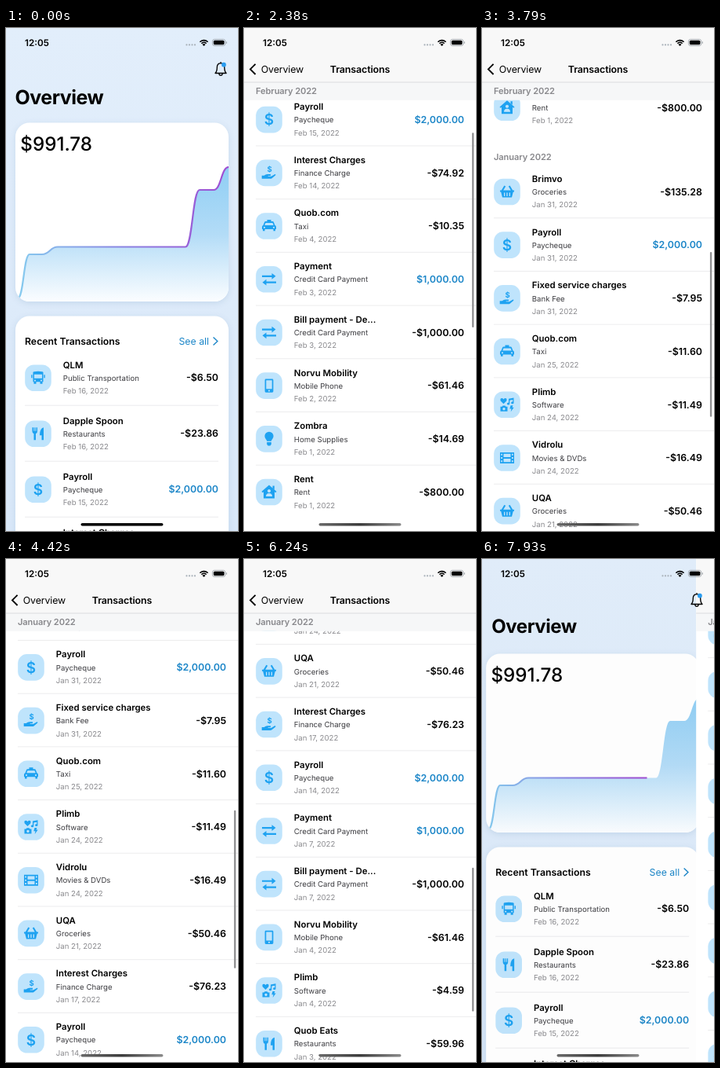
These frames come from a looping animation (296x640 px, 8 s). An HTML page with a canvas:

```html
<!DOCTYPE html>
<html lang="en">
<head>
<meta charset="utf-8">
<title>Overview</title>
<style>
html, body { margin: 0; width: 100%; height: 100%; overflow: hidden; background: #fff; }
canvas { display: block; width: 296px; height: 640px; }
</style>
</head>
<body>
<canvas id="stage"></canvas>
<script>
const W = 296, H = 640, LOOP = 8000;
const canvas = document.getElementById('stage');
const ctx = canvas.getContext('2d');
const dpr = window.devicePixelRatio || 1;
canvas.width = W * dpr;
canvas.height = H * dpr;

const BLUE = '#1c86c8', GLYPH = '#1ea2f1', TILE = '#bfe4fc', INK = '#000';
const ROW = 67.7, HEAD = 22.8, HEAD_GAP = 16.7, BAR = 69;

const clamp = v => Math.max(0, Math.min(1, v));
const lerp = (a, b, k) => a + (b - a) * k;
// Critically damped spring, s in seconds
const spring = s => s <= 0 ? 0 : s > 0.54 ? 1 : 1 - (1 + 15 * s) * Math.exp(-15 * s);

// ---------- data ----------
const FEBRUARY = [
  ['bus', 'QLM', 'Public Transportation', 'Feb 16', '-$6.50'],
  ['food', 'Dapple Spoon', 'Restaurants', 'Feb 16', '-$23.86'],
  ['pay', 'Payroll', 'Paycheque', 'Feb 15', '$2,000.00'],
  ['hand', 'Interest Charges', 'Finance Charge', 'Feb 14', '-$74.92'],
  ['taxi', 'Quob.com', 'Taxi', 'Feb 4', '-$10.35'],
  ['swap', 'Payment', 'Credit Card Payment', 'Feb 3', '$1,000.00'],
  ['swap', 'Bill payment - De...', 'Credit Card Payment', 'Feb 3', '-$1,000.00'],
  ['phone', 'Norvu Mobility', 'Mobile Phone', 'Feb 2', '-$61.46'],
  ['bulb', 'Zombra', 'Home Supplies', 'Feb 1', '-$14.69'],
  ['house', 'Rent', 'Rent', 'Feb 1', '-$800.00']
];
const JANUARY = [
  ['basket', 'Brimvo', 'Groceries', 'Jan 31', '-$135.28'],
  ['pay', 'Payroll', 'Paycheque', 'Jan 31', '$2,000.00'],
  ['hand', 'Fixed service charges', 'Bank Fee', 'Jan 31', '-$7.95'],
  ['taxi', 'Quob.com', 'Taxi', 'Jan 25', '-$11.60'],
  ['media', 'Plimb', 'Software', 'Jan 24', '-$11.49'],
  ['film', 'Vidrolu', 'Movies & DVDs', 'Jan 24', '-$16.49'],
  ['basket', 'UQA', 'Groceries', 'Jan 21', '-$50.46'],
  ['hand', 'Interest Charges', 'Finance Charge', 'Jan 17', '-$76.23'],
  ['pay', 'Payroll', 'Paycheque', 'Jan 14', '$2,000.00'],
  ['swap', 'Payment', 'Credit Card Payment', 'Jan 7', '$1,000.00'],
  ['swap', 'Bill payment - De...', 'Credit Card Payment', 'Jan 7', '-$1,000.00'],
  ['phone', 'Norvu Mobility', 'Mobile Phone', 'Jan 4', '-$61.46'],
  ['media', 'Plimb', 'Software', 'Jan 4', '-$4.59'],
  ['food', 'Quob Eats', 'Restaurants', 'Jan 3', '-$59.96'],
  ['bulb', 'Zombra', 'Home Supplies', 'Jan 2', '-$18.20'],
  ['house', 'Rent', 'Rent', 'Jan 1', '-$800.00']
];
const SECTIONS = [['February 2022', FEBRUARY], ['January 2022', JANUARY]];

// ---------- glyphs, centred on the tile ----------
const holes = [-7.7, 6].map(x => [-5.2, -1, 3.2].map(y => `M${x} ${y}h1.7v2h-1.7z`).join('')).join('');
const GLYPHS = {
  bus: 'M-6.5-7q0-1.5 6.5-1.5t6.5 1.5v12h-1v2.5h-3v-2.5h-5v2.5h-3v-2.5h-1z M-5-4.5v5h10v-5z M-4 2.2a1 1 0 1 0 .01 0z M4 2.2a1 1 0 1 0 .01 0z M-8.8-4h1.4v4h-1.4z M7.4-4h1.4v4h-1.4z',
  food: 'M-7.5-8v5q0 2.5 2 3v8h2.5v-8q2-.5 2-3v-5h-1.4v4.5h-1v-4.5h-1.2v4.5h-1v-4.5z M7-8v16h-2.5v-6h-2.5q0-9 5-10z',
  hand: 'M-9.3 3.4h3q2-1.8 4-1.8h4q1.2.8 0 2h-3v.8h4l4.4-2.6q1.6-.3 1.2 1.2l-4.7 3.8q-1 .6-2 .6h-10.9z',
  taxi: 'M-2.5-8h5v2h2q1 0 1.4 1l1.6 4q1.5.5 1.5 2v3h-1v2.2h-2.6v-2.2h-10.8v2.2h-2.6v-2.2h-1v-3q0-1.5 1.5-2l1.6-4q.4-1 1.4-1h2z M-4.5-4l-1.2 3h11.4l-1.2-3z M-6 .6a1.1 1.1 0 1 0 .01 0z M6 .6a1.1 1.1 0 1 0 .01 0z',
  swap: 'M-9-5h12.5v-2.8l5 3.9-5 3.9v-2.8h-12.5z M9 2.8h-12.5v-2.8l-5 3.9 5 3.9v-2.8h12.5z',
  phone: 'M-4-8.6h8q1.4 0 1.4 1.4v14.4q0 1.4-1.4 1.4h-8q-1.4 0-1.4-1.4v-14.4q0-1.4 1.4-1.4z M-3.7-6.8v11h7.4v-11z M0 5.4a1 1 0 1 0 .01 0z',
  bulb: 'M-2.8 3q0-1.4-1.4-2.9a5.6 5.6 0 1 1 8.4 0q-1.4 1.5-1.4 2.9z M-2.8 4.2h5.6v2.6l-1.4 1.8h-2.8l-1.4-1.8z',
  house: 'M0-9l9.5 8.2-1.2 1.4-1.3-1v8.4h-14v-8.4l-1.3 1-1.2-1.4z M0-3.6a2.1 2.1 0 1 0 .01 0z M-4 5.4q0-4 4-4t4 4z M4.5-8h2.3v4.6l-2.3-2z',
  basket: 'M-9-2h18v2h-1.2l-1.8 7h-12l-1.8-7h-1.2z M-4 1v4.5h1.3v-4.5z M-.65 1v4.5h1.3v-4.5z M2.7 1v4.5h1.3v-4.5z M-3.6-8l1.8 1-3 5h-2.4z M3.6-8l-1.8 1 3 5h2.4z',
  media: 'M-4.5-1l-3.8-3.8q-1-3.4 1.8-3.4 1.5.2 2 1.4 .5-1.2 2-1.4 2.8 0 1.8 3.4z M2-7.5l6.5-1.2v6.2a1.7 1.4 0 1 1-1.2-1.2v-2.6l-4 .8v4.2a1.7 1.4 0 1 1-1.3-1.2z M-8.5 2.5h2l1-1.3h3l1 1.3h2v6h-9z M-4 3.7a1.7 1.7 0 1 0 .01 0z M4.5 1h3l-1 2.5h2.2l-4 5.5 .8-3.8h-2.2z',
  film: 'M-9-7h18v14h-18z M-4.5-5.3v4.3h9v-4.3z M-4.5 1v4.3h9v-4.3z ' + holes
};
for (const k in GLYPHS) GLYPHS[k] = new Path2D(GLYPHS[k]);

// ---------- helpers ----------
// y is the middle of the capitals
function text(str, x, y, size, weight = 400, color = INK, align = 'left', spacing = 0) {
  ctx.font = `${weight} ${size}px Inter, "Liberation Sans", sans-serif`;
  ctx.letterSpacing = spacing + 'px';
  ctx.textRendering = 'geometricPrecision';
  ctx.textAlign = align;
  ctx.fillStyle = color;
  ctx.fillText(str, x, y + size * 0.36);
}
function box(x, y, w, h, r, color) {
  ctx.beginPath();
  ctx.roundRect(x, y, w, h, r);
  ctx.fillStyle = color;
  ctx.fill();
}
function line(points, color, width) {
  ctx.beginPath();
  points.forEach(([x, y]) => ctx.lineTo(x, y));
  ctx.strokeStyle = color;
  ctx.lineWidth = width;
  ctx.stroke();
}
function layer(alpha, draw) {
  if (alpha <= 0) return;
  ctx.save();
  ctx.globalAlpha *= alpha;
  draw();
  ctx.restore();
}
function gradient(x0, y0, x1, y1, ...colors) {
  const g = ctx.createLinearGradient(x0, y0, x1, y1);
  colors.forEach((c, i) => g.addColorStop(i / (colors.length - 1), c));
  return g;
}

function icon(kind, x, y) {
  box(x - 16.8, y - 16.8, 33.6, 33.6, 11.5, TILE);
  if (kind === 'pay') text('$', x, y, 19, 600, GLYPH, 'center');
  if (kind === 'hand') text('$', x + 0.5, y - 4.6, 9.5, 700, GLYPH, 'center');
  if (!GLYPHS[kind]) return;
  ctx.save();
  ctx.translate(x, y);
  ctx.fillStyle = GLYPH;
  ctx.fill(GLYPHS[kind], 'evenodd');
  ctx.restore();
}

// x: left edge, right: edge of the amount, y: middle of the title
function row([kind, title, sort, day, amount], x, right, y) {
  icon(kind, x + 17, y + 17);
  text(title, x + 48.8, y + 0.3, 11.4, 600);
  text(sort, x + 48.8, y + 17.2, 9.65, 400, '#3c3c40');
  text(day + ', 2022', x + 48.8, y + 33.5, 9.6, 400, '#8a8a8e');
  text(amount, right, y + 16.8, 12.4, 600, amount[0] === '$' ? BLUE : INK, 'right');
}

// ---------- overview ----------
const STEPS = [[30, 288, 46], [66, 278.5, 229], [247, 206, 265], [284, 177, 284]];
function traceChart() {
  let x = 15, y = 344;
  ctx.beginPath();
  ctx.moveTo(x, y);
  for (const [nx, ny, end] of STEPS) {
    const m = (x + nx) / 2;
    ctx.bezierCurveTo(m, y, m, ny, nx, ny);
    ctx.lineTo(end, ny);
    x = end;
    y = ny;
  }
}
function card(y, h) {
  ctx.save();
  ctx.shadowColor = 'rgba(70,110,160,.16)';
  ctx.shadowBlur = 9 * dpr;
  ctx.shadowOffsetY = 2 * dpr;
  box(12, y, 272, h, 18, '#fff');
  ctx.restore();
}
function chart(drawn) {
  card(120.5, 227.5);
  ctx.save();
  ctx.beginPath();
  ctx.roundRect(12, 120.5, 272, 227.5, 18);
  ctx.clip();
  traceChart();
  ctx.lineTo(284, 348);
  ctx.lineTo(15, 348);
  ctx.fillStyle = gradient(0, 177, 0, 348, '#8fcef4', '#b3dcf7', '#fbfdff');
  ctx.fill();
  const end = 12 + 272 * drawn;
  ctx.beginPath();
  ctx.rect(12, 120, end - 12, 230);
  ctx.clip();
  traceChart();
  ctx.strokeStyle = gradient(12, 0, Math.max(end, 13), 0, '#86cdef', '#8a84e2', '#a04cd2');
  ctx.lineWidth = 2.2;
  ctx.stroke();
  ctx.restore();
  text('$991.78', 18.3, 147.5, 24.2, 500);
}
function overview(drawn, pressed) {
  ctx.fillStyle = gradient(0, 0, 0, H, '#e2eefb', '#d9e8f9');
  ctx.fillRect(0, 0, W + 90, H);
  chart(drawn);
  card(366.5, 300);
  text('Recent Transactions', 24, 398.5, 12.3, 600);
  layer(pressed ? 0.4 : 1, () => {
    text('See all', 259, 398.5, 12.3, 400, BLUE, 'right');
    line([[264.5, 393.5], [269.8, 398.5], [264.5, 403.5]], BLUE, 1.4);
  });
  for (let i = 0; i < 4; i++) {
    const y = 428.2 + 71 * i;
    row(FEBRUARY[i], 24, 271, y);
    if (i) line([[24, y - 19], [271, y - 19]], '#e4e4e6', 0.7);
  }
}

// ---------- transactions ----------
const PATH = [[1895, -HEAD_GAP], [2380, 143.4], [3250, 464.9], [4420, 771.2], [5270, 834.9], [6240, 1104.7], [7500, 1223.1]];
const rate = i => (PATH[i + 1][1] - PATH[i][1]) / (PATH[i + 1][0] - PATH[i][0]);
const slope = i => {
  if (i === 0 || i === PATH.length - 1) return 0;
  const a = rate(i - 1), b = rate(i);
  return 2 * a * b / (a + b);
};
// Monotone cubic through the scroll positions
function scrollAt(t) {
  const last = PATH.length - 1;
  if (t <= PATH[0][0]) return PATH[0][1];
  if (t >= PATH[last][0]) return PATH[last][1];
  let i = 0;
  while (t > PATH[i + 1][0]) i++;
  const [t0, a] = PATH[i], [t1, b] = PATH[i + 1];
  const d = t1 - t0, u = (t - t0) / d, u2 = u * u, u3 = u2 * u;
  return a * (2 * u3 - 3 * u2 + 1) + b * (3 * u2 - 2 * u3) +
    d * (slope(i) * (u3 - 2 * u2 + u) + slope(i + 1) * (u3 - u2));
}

function transactions(t) {
  const s = scrollAt(t), moved = s + HEAD_GAP;
  const bar = clamp(moved / 14);
  ctx.fillStyle = '#fff';
  ctx.fillRect(0, 0, W, H);
  const heads = [];
  let top = BAR - s;
  for (const [name, rows] of SECTIONS) {
    heads.push([name, top]);
    top += HEAD;
    rows.forEach((r, i) => {
      const y = top + i * ROW;
      if (y < 0 || y > H) return;
      if (i) line([[15, y - 1.2], [W, y - 1.2]], '#e4e4e6', 0.7);
      row(r, 15, 281, y + 16.2);
    });
    top += rows.length * ROW + HEAD_GAP;
  }
  heads.forEach(([name, y], i) => {
    const limit = heads[i + 1] ? heads[i + 1][1] - HEAD : Infinity;
    const at = Math.min(Math.max(y, BAR), limit);
    if (y < BAR) {
      ctx.fillStyle = '#f6f7f8';
      ctx.fillRect(0, at, W, HEAD);
    }
    text(name, 15, at + 11.3, 11.1, 600, '#88888c', 'left', -0.1);
  });
  // Before any scrolling the bar is plain white
  ctx.fillStyle = '#fff';
  ctx.fillRect(0, 0, W, BAR);
  layer(bar, () => {
    ctx.fillStyle = '#f8f8f8';
    ctx.fillRect(0, 0, W, BAR);
    line([[0, BAR], [W, BAR]], '#cfcfd2', 0.7);
  });
  layer(clamp((t - 1900) / 120) * clamp((7850 - t) / 200), () => {
    const len = 1 / (0.0038 + 1.49e-6 * moved);
    box(290.9, 71 + moved * len / 637, 2.4, len, 1.2, '#909092');
  });
}

// ---------- bars ----------
function bell() {
  ctx.lineJoin = ctx.lineCap = 'round';
  ctx.strokeStyle = INK;
  ctx.lineWidth = 1.35;
  ctx.stroke(new Path2D('M267 57.5q2.3-2.2 2.3-7.5 0-5.2 4.7-5.2t4.7 5.2q0 5.3 2.3 7.5z M271.8 58q.2 2.3 2.2 2.3t2.2-2.3 M274 44.6v-1'));
  ctx.lineJoin = 'miter';
  ctx.lineCap = 'butt';
  box(275, 43.8, 5.8, 5.8, 2.9, '#2a9df0');
}
function navigation(p, tapped) {
  layer(clamp(1.2 - 2 * p), bell);
  const x = lerp(11.5, 21.8, p), y = lerp(88, 52.3, p), k = lerp(1, 0.5, p);
  layer(clamp(1.5 - 2 * p), () => text('Overview', x, y, 25 * k, 700, INK, 'left', -0.5 * k));
  layer(tapped ? 0.35 : 1, () => {
    layer(clamp(2 * p - 0.5), () => text('Overview', x, y, 24.8 * k, 400, INK, 'left', -0.3 * k));
    layer(clamp(2 * p - 1), () => line([[14.6, 45.8], [8, 52.4], [14.6, 59]], INK, 1.9));
  });
  layer(clamp(1.6 * p - 0.6), () => text('Transactions', 148 + 150 * (1 - p), 52.3, 12.4, 600, INK, 'center', -0.1));
}
function statusBar() {
  text('12:05', 24, 19, 11.7, 600);
  for (let i = 0; i < 4; i++) box(229.4 + i * 3.5, 20.3, 2.2, 2.2, 1.1, '#aab2ba');
  ctx.strokeStyle = INK;
  ctx.lineWidth = 1.6;
  for (const r of [4.2, 7]) {
    ctx.beginPath();
    ctx.arc(252.5, 22.6, r, -Math.PI * 0.76, -Math.PI * 0.24);
    ctx.stroke();
  }
  ctx.beginPath();
  ctx.moveTo(252.5, 23);
  ctx.arc(252.5, 23, 2.8, -Math.PI * 0.76, -Math.PI * 0.24);
  ctx.fillStyle = INK;
  ctx.fill();
  ctx.beginPath();
  ctx.roundRect(263.4, 14.4, 16.4, 8.2, 2.6);
  ctx.strokeStyle = '#9aa0a6';
  ctx.lineWidth = 0.8;
  ctx.stroke();
  box(264.8, 15.8, 13.6, 5.4, 1.5, INK);
  box(280.7, 17.2, 1.1, 2.6, 0.6, '#9aa0a6');
}

function render(t) {
  ctx.setTransform(dpr, 0, 0, dpr, 0, 0);
  const p = t < 7000 ? spring((t - 630) / 1000) : 1 - spring((t - 7650) / 1000);
  const drawn = t < 7000 ? 1 : clamp((t - 7700) / 306);
  if (p < 1) {
    ctx.save();
    ctx.translate(-0.3 * W * p, 0);
    overview(drawn, t >= 500 && t < 1200);
    ctx.restore();
    ctx.fillStyle = `rgba(0,0,0,${0.1 * p})`;
    ctx.fillRect(0, 0, W, H);
  }
  if (p > 0) {
    ctx.save();
    ctx.translate(W * (1 - p), 0);
    transactions(t);
    ctx.restore();
  }
  navigation(p, t >= 7560);
  statusBar();
  box(95.5, 630, 105, 3.6, 1.8, p > 0 ? gradient(95, 0, 201, 0, '#6a6a6a', '#3c3c3c', '#8c8c8c') : INK);
}

function tick(now) {
  render(now % LOOP);
  requestAnimationFrame(tick);
}
render(0);
requestAnimationFrame(tick);
</script>
</body>
</html>
```
